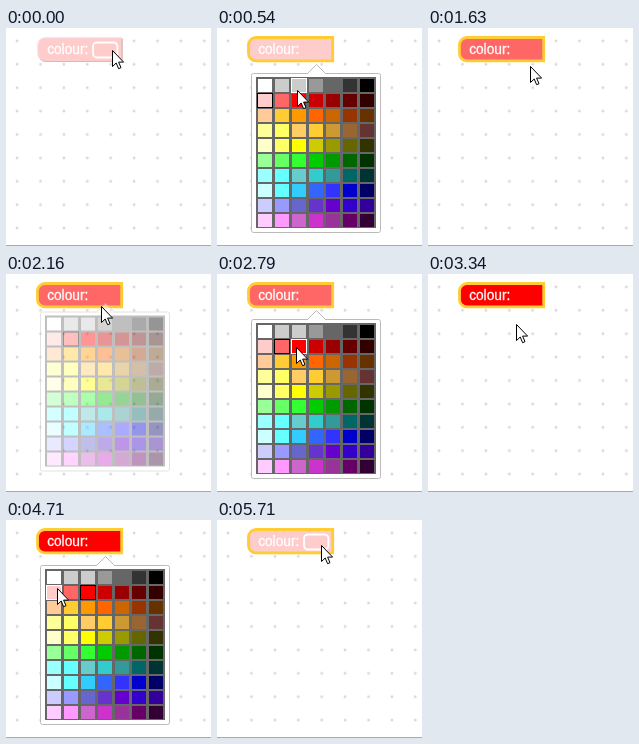
Animation of 205x218 px, one loop 5.79 s. Source, as an HTML page:

```html
<!DOCTYPE html>
<html lang="en">
<head>
<meta charset="utf-8">
<title>Colour field</title>
<style>
  html, body { margin: 0; width: 100%; height: 100%; overflow: hidden; background: #fff; }
  svg { display: block; }
  text { font: 14.67px "Liberation Sans", Arial, sans-serif; fill: #fff; stroke: #fff; stroke-width: .3; }
</style>
</head>
<body>
<svg width="205" height="218" viewBox="0 0 205 218">
  <defs>
    <pattern id="grid" x="-.6" y="1.2" width="23.4" height="23.4" patternUnits="userSpaceOnUse">
      <path d="M10.3 11.7h2.8M11.7 10.3v2.8" stroke="#ccc"/>
    </pattern>
    <path id="shape" d="M8 0H90V25H8A8 8 0 0 1 0 17V8A8 8 0 0 1 8 0Z"/>
  </defs>
  <rect width="205" height="217" fill="url(#grid)"/>
  <path d="M0 217.5H205" stroke="#aaa"/>

  <g transform="translate(31.5 9.5) scale(.9355)">
    <use id="shade" href="#shape" x="1" y="1" fill="#cca3a3"/>
    <use id="block" href="#shape" stroke-width="3"/>
    <path id="light" d="M2.5 19.5Q.5 17 .5 14V8A7.5 7.5 0 0 1 8 .5H89.5" fill="none" stroke="#ffdbdb"/>
    <text x="10.3" y="17.2">colour:</text>
    <rect id="field" x="59.4" y="5.4" width="26" height="16" rx="4" fill="none" stroke="#fff" stroke-width="2"/>
  </g>

  <g id="menu">
    <rect x="34.5" y="45.5" width="129" height="159" rx="2" fill="#fff" stroke="#bbb"/>
    <path d="M90 46L99.5 36.5L109 46" fill="#fff" stroke="#bbb"/>
    <rect x="39" y="49" width="120" height="151" fill="#666"/>
    <g id="swatches"></g>
    <rect id="selected" width="15" height="14" fill="none" stroke="#000"/>
    <rect id="hovered" width="15" height="14" fill="none" stroke="#fff"/>
  </g>

  <path id="cursor" d="M.5 .5V16.5L4.2 13L6.6 18.7L9 17.7L6.6 12.1H11.6Z" fill="#fff" stroke="#000"/>
</svg>
<script>
const LOOP = 5790, STEP = 77, FADE = 250;
const COLUMNS = 7, CELL_W = 17, CELL_H = 15, LEFT = 40, TOP = 50;

// Each row runs from light to dark through four shades
const ramps = ['fff bbb 666 000', 'fcc f00 900 300', 'fc9 f90 c60 630', 'ff9 fc6 c93 633',
  'ffc ff0 990 330', '9f9 3f3 090 030', '9ff 6cc 399 033', 'cff 3cf 33f 006',
  'ccf 66c 60c 309', 'fcf c6c 939 303'];

// Blends neighbouring shades, then snaps each channel to a web-safe step
function rampColour(ramp, column) {
  const shades = ramp.split(' ');
  const a = shades[Math.floor(column / 2)], b = shades[Math.ceil(column / 2)];
  const channels = [0, 1, 2].map(i => {
    const level = (parseInt(a[i], 16) + parseInt(b[i], 16)) / 6;
    return Math.round(level + (level - 3) * .1) * 51;
  });
  return `rgb(${channels})`;
}
const palette = ramps.flatMap(ramp =>
  Array.from({ length: COLUMNS }, (_, column) => rampColour(ramp, column)));

const visits = [
  { open: 170, click: 1090, pick: 8 },
  { open: 2090, click: 3090, pick: 9 },
  { open: 4020, click: 5090, pick: 7 }
];
// Pointer stops: arrival, departure, x, y
const stops = [
  [0, 320, 106, 22], [552, 552, 80, 62], [770, 1240, 65, 74],
  [1630, 1630, 102, 38], [1860, 2090, 100, 21], [2785, 3200, 79, 73],
  [3710, 4160, 100, 20], [4630, 5250, 51, 68], [5710, LOOP, 104, 25]
];

const el = id => document.getElementById(id);
const set = (id, attrs) => {
  for (const name in attrs) el(id).setAttribute(name, attrs[name]);
};
const show = (id, on) => set(id, { visibility: on ? 'visible' : 'hidden' });
const cellAt = (column, row) => ({ x: LEFT + column * CELL_W + .5, y: TOP + row * CELL_H + .5 });
const easeOut = p => 1 - (1 - Math.min(1, Math.max(0, p))) ** 2;

el('swatches').innerHTML = palette.map((colour, i) => {
  const { x, y } = cellAt(i % COLUMNS, Math.floor(i / COLUMNS));
  return `<rect x="${x + .5}" y="${y + .5}" width="14" height="13" fill="${colour}"/>`;
}).join('');

function pointerAt(t) {
  const i = stops.findLastIndex(stop => stop[0] <= t);
  const [, leave, x, y] = stops[i];
  const [arrive, , nextX, nextY] = stops[i + 1] || stops[i];
  const k = t > leave ? easeOut((t - leave) / (arrive - leave)) : 0;
  return [x + (nextX - x) * k, y + (nextY - y) * k].map(Math.round);
}

function draw(t) {
  const [x, y] = pointerAt(t);
  let chosen = 7, shown = 0;
  for (const { open, click, pick } of visits) {
    shown += easeOut((t - open) / FADE) - easeOut((t - click) / FADE);
    if (t >= click) chosen = pick;
  }
  const active = t >= 90;
  set('block', { fill: palette[chosen], stroke: active ? '#fc3' : 'none' });
  show('shade', !active);
  show('light', !active);
  show('field', x > 86 && x < 113 && y > 13 && y < 31);

  set('menu', { opacity: shown ** 1.4, transform: `translate(0 ${-16 * (1 - shown)})` });
  set('selected', cellAt(chosen % COLUMNS, Math.floor(chosen / COLUMNS)));
  set('hovered', cellAt(Math.floor((x - LEFT) / CELL_W), Math.floor((y - TOP) / CELL_H)));
  show('hovered', y >= TOP);
  set('cursor', { transform: `translate(${x} ${y})` });
}

const began = performance.now();
function tick() {
  const t = (performance.now() - began) % LOOP;
  draw(Math.max(0, 90 + STEP * Math.floor((t - STEP) / STEP)));
  requestAnimationFrame(tick);
}
tick();
</script>
</body>
</html>
```
